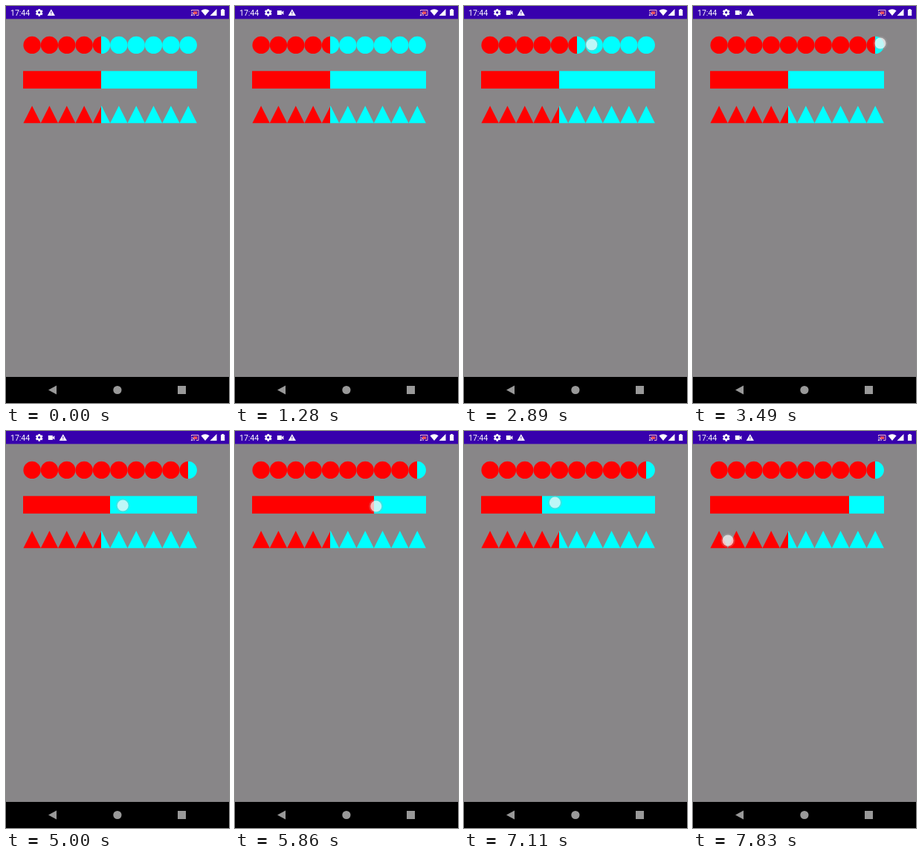
These frames come from a looping animation (300x533 px, 8 s). An HTML page with a canvas:

```html
<!DOCTYPE html>
<html lang="en">
<head>
<meta charset="utf-8">
<title>Rating bars</title>
<style>
  html, body { margin: 0; width: 100%; height: 100%; overflow: hidden; background: #888688; }
  canvas { display: block; width: 300px; height: 533px; }
</style>
</head>
<body>
<canvas id="stage"></canvas>
<script>
const W = 300, H = 533, LOOP = 8000;
const LEFT = 23.4, UNIT = 23.35, COUNT = 10, LAG = 50;
const canvas = document.getElementById('stage');
const ctx = canvas.getContext('2d');
const ratio = window.devicePixelRatio || 1;
canvas.width = W * ratio;
canvas.height = H * ratio;
ctx.scale(ratio, ratio);

// Each touch: row index, moment the drag starts, path of [time, x, y].
const touches = [
  { row: 0, drag: 2350, path: [
    [1830, 34, 54], [2350, 34, 54], [3100, 225, 51], [3180, 227, 51],
    [3440, 250, 50], [3490, 252, 50], [3740, 252, 50]] },
  { row: 1, drag: 5000, path: [
    [3910, 149, 100], [4999, 149, 100], [5000, 157, 100], [5350, 212, 101],
    [5600, 208, 101], [5740, 208, 101], [5860, 190, 101], [6480, 34, 98],
    [6560, 34, 98], [7110, 122, 96], [7350, 216, 97], [7480, 216, 97]] },
  { row: 2, drag: Infinity, path: [[7650, 47, 147], [LOOP, 47, 147]] }
];

function pointAt(path, t) {
  if (t <= path[0][0]) return path[0].slice(1);
  for (let i = 1; i < path.length; i++) {
    const [t0, x0, y0] = path[i - 1], [t1, x1, y1] = path[i];
    if (t <= t1) {
      const k = (t - t0) / (t1 - t0);
      return [x0 + (x1 - x0) * k, y0 + (y1 - y0) * k];
    }
  }
  return path[path.length - 1].slice(1);
}

// Ratings snap down to half steps.
function rating(touch, t) {
  if (t < touch.drag) return 4.5;
  const x = pointAt(touch.path, t - LAG)[0];
  const v = Math.floor((x - LEFT) / UNIT * 2) / 2;
  return Math.max(0, Math.min(COUNT, v));
}

function disc(x, y, r, color) {
  ctx.fillStyle = color;
  ctx.beginPath();
  ctx.arc(x, y, r, 0, Math.PI * 2);
  ctx.fill();
}

function poly(color, ...pts) {
  ctx.fillStyle = color;
  ctx.beginPath();
  pts.forEach(([x, y]) => ctx.lineTo(x, y));
  ctx.closePath();
  ctx.fill();
}

function box(x, y, w, h, color) {
  ctx.fillStyle = color;
  ctx.fillRect(x, y, w, h);
}

const shapes = [
  (x, color) => disc(x + UNIT / 2, 52.4, UNIT / 2, color),
  (x, color) => box(Math.round(x), 87.3, Math.round(x + UNIT) - Math.round(x), 23.5, color),
  (x, color) => poly(color, [x, 157.3], [x + UNIT / 2, 134], [x + UNIT, 157.3])
];

function drawPart(shape, from, to, color) {
  ctx.save();
  ctx.beginPath();
  ctx.rect(from, 30, to - from, 140);
  ctx.clip();
  for (let i = 0; i < COUNT; i++) shape(LEFT + i * UNIT, color);
  ctx.restore();
}

function drawRow(row, value) {
  const split = Math.round(LEFT + value * UNIT);
  drawPart(shapes[row], 0, split, '#ff0000');
  drawPart(shapes[row], split, W, '#00ffff');
}

function gear(x, y) {
  ctx.save();
  ctx.translate(x, y);
  for (let i = 0; i < 6; i++) {
    ctx.rotate(Math.PI / 3);
    box(-1.3, -4.9, 2.6, 3, '#fff');
  }
  ctx.restore();
  ctx.strokeStyle = '#fff';
  ctx.lineWidth = 2;
  ctx.beginPath();
  ctx.arc(x, y, 2.7, 0, Math.PI * 2);
  ctx.stroke();
}

function camera(alpha) {
  ctx.globalAlpha = alpha;
  box(56.8, 6, 6, 6, '#fff');
  poly('#fff', [62.5, 8.4], [65.3, 6.2], [65.3, 11.8], [62.5, 9.6]);
  ctx.globalAlpha = 1;
}

function warning(x) {
  poly('#fff', [x, 4.2], [x + 5.1, 13], [x - 5.1, 13]);
  box(x - 0.5, 7.3, 1, 2.6, '#3700ad');
  box(x - 0.5, 10.7, 1, 1, '#3700ad');
}

function castIcon() {
  ctx.strokeStyle = '#f0b4c8';
  ctx.lineWidth = 1;
  ctx.beginPath();
  ctx.moveTo(249.5, 7);
  ctx.lineTo(249.5, 5.5);
  ctx.lineTo(259, 5.5);
  ctx.lineTo(259, 12.5);
  ctx.lineTo(256, 12.5);
  ctx.stroke();
  box(252, 7.2, 5.2, 3.8, '#e8505f');
  ctx.strokeStyle = '#f5d5df';
  for (const r of [2.2, 4.2]) {
    ctx.beginPath();
    ctx.arc(249.2, 13, r, -Math.PI / 2, 0);
    ctx.stroke();
  }
  disc(249.6, 12.5, 0.8, '#fff');
}

function statusBar(t) {
  box(0, 0, W, 17.4, '#3700ad');
  ctx.fillStyle = '#fff';
  ctx.font = '10.5px Roboto, sans-serif';
  ctx.fillText('17:44', 6, 12.8);
  const k = Math.max(0, Math.min(1, (t - 60) / 380));
  const ease = k * k * (3 - 2 * k);
  gear(44.7, 8.8);
  camera(ease);
  warning(60.8 + 16 * ease);
  castIcon();
  ctx.fillStyle = '#fff';
  ctx.beginPath();
  ctx.moveTo(268, 13);
  ctx.lineTo(262.4, 6.3);
  ctx.quadraticCurveTo(268, 2.3, 273.6, 6.3);
  ctx.fill();
  poly('#fff', [274.5, 13], [283.5, 13], [283.5, 4]);
  box(289, 5, 5.2, 8, '#fff');
  box(290.4, 4, 2.4, 1.2, '#fff');
}

function navBar() {
  const gray = '#999';
  box(0, 498, W, 35, '#000');
  poly(gray, [57, 515.5], [68, 509.6], [68, 521.4]);
  disc(149.9, 515.5, 5.6, gray);
  box(231, 510, 11, 11, gray);
}

function pointer(x, y) {
  disc(x, y, 9.6, 'rgba(175,175,175,.3)');
  disc(x, y, 7.5, 'rgba(255,255,255,.68)');
}

function draw(t) {
  box(0, 0, W, H, '#888688');
  statusBar(t);
  navBar();
  touches.forEach(touch => drawRow(touch.row, rating(touch, t)));
  for (const { path } of touches) {
    if (t >= path[0][0] && t < path[path.length - 1][0]) pointer(...pointAt(path, t));
  }
}

const start = performance.now();
function tick() {
  draw((performance.now() - start) % LOOP);
  requestAnimationFrame(tick);
}
tick();
</script>
</body>
</html>
```
